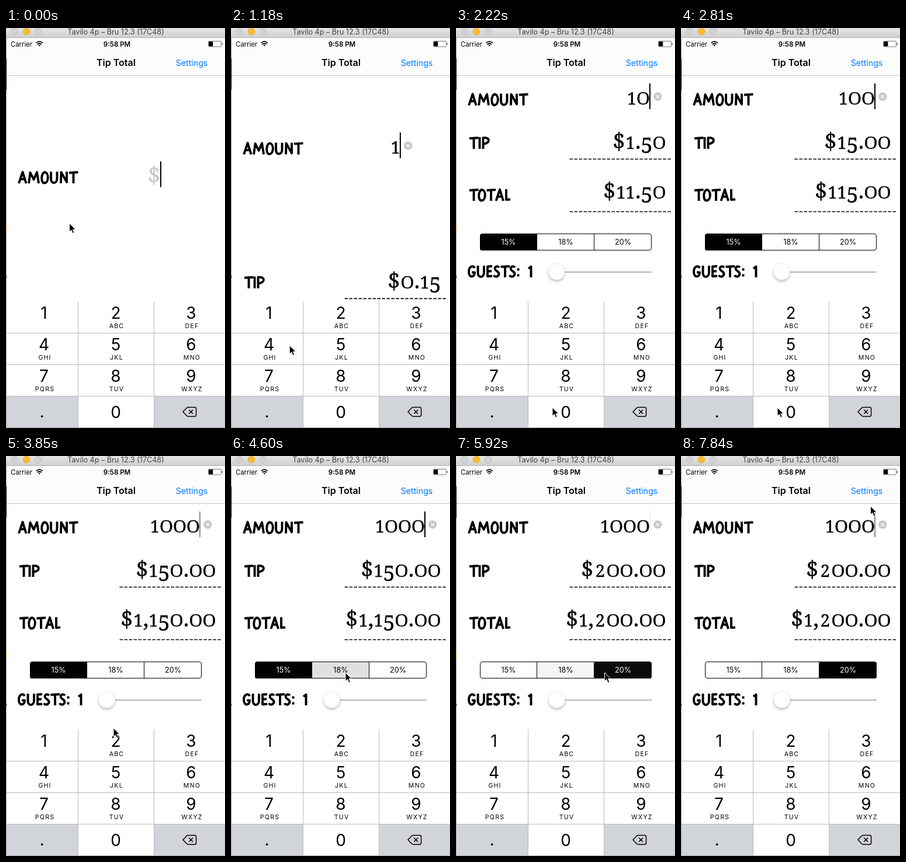
An HTML page that plays this animation: 375 by 685 pixels, repeating every 7990 ms.

```html
<!DOCTYPE html>
<html lang="en">
<head>
<meta charset="utf-8">
<title>Tip Total</title>
<style>
html, body { margin: 0; width: 100%; height: 100%; overflow: hidden; background: #fff; }
svg { display: block; width: 375px; height: 685px; }
text { font-family: Inter, Roboto, sans-serif; text-anchor: middle; }
.num text { font-family: "Noto Serif", serif; stroke-width: .4; }
.num .round { font-family: "Liberation Serif", serif; }
.ink path { fill: none; stroke: #000; stroke-width: 3.9; stroke-linejoin: round; }
.digit { font-size: 28px; }
.abc { font-size: 10.6px; letter-spacing: 1.2px; }
.seg text { font-size: 12.6px; }
</style>
</head>
<body>
<svg viewBox="0 0 375 685" xmlns="http://www.w3.org/2000/svg">
  <defs>
    <linearGradient id="bar" x2="0" y2="1">
      <stop stop-color="#e4e4e4"/><stop offset="1" stop-color="#d0d0d0"/>
    </linearGradient>
    <filter id="shade" x="-50%" y="-50%" width="200%" height="200%">
      <feDropShadow dx="0" dy="2.5" stdDeviation="2" flood-opacity=".28"/>
    </filter>
  </defs>
  <rect width="375" height="685" fill="#fff"/>

  <!-- amount -->
  <g id="amount">
    <g class="ink" data-word="AMOUNT" transform="translate(20 112)"></g>
    <g id="field">
      <g class="num" id="value"></g>
      <rect id="caret" x="331" y="95" width="2" height="44"/>
      <g id="clear">
        <circle cx="345.3" cy="117.5" r="7.2" fill="#c8c8cb"/>
        <path d="M342.5 114.7l5.6 5.6m0-5.6l-5.6 5.6" stroke="#fff" stroke-width="1.3"/>
      </g>
    </g>
  </g>

  <!-- results -->
  <g id="panel">
    <g class="ink" data-word="TIP" transform="translate(23 186.5)"></g>
    <g class="ink" data-word="TOTAL" transform="translate(23 275.5)"></g>
    <g class="ink" data-word="GUESTS:" transform="translate(20 406.5)"></g>
    <g class="ink" data-word="1" transform="translate(123.5 406.5)"></g>
    <g class="num" id="tip"></g>
    <g class="num" id="total"></g>
    <path d="M194.5 224.5H368M194.5 314.5H368" stroke="#000" stroke-width="1.7" stroke-dasharray="5.6 2.39"/>
    <g class="seg" id="segs"></g>
    <path d="M172 418H335" stroke="#b5b5b6" stroke-width="2"/>
    <circle cx="172.5" cy="417.3" r="14" fill="#fff" stroke="#ddd" stroke-width=".5" filter="url(#shade)"/>
  </g>

  <g id="keypad"></g>

  <!-- window and bars -->
  <rect y="16" width="375" height="65" fill="#fcfcfc"/>
  <path d="M0 81.5H375" stroke="#c4c4c6"/>
  <path d="M.5 17V685M0 684.5H375" stroke="#a9a9ab"/>
  <path d="M.5 52V106M.5 424V428" stroke="#111"/>
  <path d="M.5 337V347" stroke="#e79a2e"/>
  <rect width="375" height="16" fill="url(#bar)"/>
  <path d="M0 16.5H375" stroke="#b4b4b4"/>
  <g stroke-width=".8">
    <circle cx="14.5" cy="6" r="5.8" fill="#d2d2d2" stroke="#bcbcbc"/>
    <circle cx="35" cy="6" r="5.8" fill="#fdbd30" stroke="#e0a02a"/>
    <circle cx="55" cy="6" r="5.8" fill="#d2d2d2" stroke="#bcbcbc"/>
  </g>
  <text x="188" y="11" font-size="12.6" fill="#404040">Tavilo 4p – Bru 12.3 (17C48)</text>
  <text x="26.5" y="31.5" font-size="11.3">Carrier</text>
  <g fill="none" stroke="#000" stroke-width="1.7">
    <path d="M51.6 25.6q5.6-4.8 11.2 0M53.6 28q3.6-3 7.2 0"/>
    <path d="M55.4 29.5q1.8-1.4 3.6 0l-1.8 2z" fill="#000" stroke="none"/>
  </g>
  <text x="190" y="31.5" font-size="11.5" font-weight="600">9:58 PM</text>
  <rect x="346.5" y="22.5" width="22" height="9.5" rx="1.5" fill="#fff" stroke="#777"/>
  <rect x="347.3" y="23.3" width="7" height="8"/>
  <rect x="369.6" y="25.5" width="1.5" height="3.5" fill="#777"/>
  <text x="188.5" y="65" font-size="16" font-weight="600">Tip Total</text>
  <text x="318" y="64.5" font-size="14.2" fill="#007aff">Settings</text>

  <path id="cursor" d="M0 0V14.6L3.4 11.5L5.8 17.2L8.3 16.1L5.9 10.6H10.6Z" stroke="#fff" stroke-width="1" stroke-linejoin="round"/>
</svg>
<script>
const $ = id => document.getElementById(id);
const LOOP = 7990, STEPS = 54;

// Marker lettering: [advance, strokes]
const INK = {
  A: [17, "M2 20.5L8.5 1L14.5 20.5M4 13.5L13.5 13"],
  M: [22, "M2 20.5L4.5 2L10.5 14L16 1.5L19 20.5"],
  O: [15.5, "M8 1.5C1 1 0 20 6.5 20C14.5 20 15 2 7 1.5"],
  U: [16.5, "M2.5 .5V13C2.5 22 13 22 13 12V.5"],
  N: [17, "M3 20.5L3.5 1.5L13 18.5V.5"],
  T: [14, "M0 2.5L15.5 1.5M7.5 2V20.5"],
  I: [7, "M3.5 .5V20.5"],
  P: [13, "M2.5 20.5V1.5C15 0 15 11.5 2.5 12"],
  L: [9, "M2.5 .5V18.5L9.5 18"],
  G: [15, "M12 4.5C9-1 1.5 2 2 12C2.5 22 12 20.5 12 12H7"],
  E: [12, "M10.5 1.5L2.5 2V18.8L10.5 18.3M2.5 10.3L9.5 9.8"],
  S: [13, "M10.5 3.5C7-.5 1.5 3 3.5 7C5 10 11 11 10 15.5C8 20.5 3.5 20 1 17"],
  ":": [5, "M3 5V9M3 15V19"],
  1: [9, "M.5 5.5L5 2V20.5"]
};
for (const g of document.querySelectorAll(".ink")) {
  const word = g.dataset.word;
  let x = 0;
  g.setAttribute("aria-label", word);
  g.innerHTML = [...word].map(c => {
    const [w, d] = INK[c], s = `<path transform="translate(${x})" d="${d}"/>`;
    x += w;
    return s;
  }).join("");
}

// Old-style figures: [glyph, advance, size, drop, class]; the low zero is a round capital
const FIG = {
  0: ["O", 23, 30.5, 0, "round"], 1: ["1", 16.1, 28.5, 0], 2: ["2", 21, 29, 0],
  5: ["5", 19.8, 36, 7], 8: ["8", 22.3, 37, 0], $: ["$", 22.9, 38, 0],
  ".": [".", 10.1, 38, 0], ",": [",", 10.1, 38, 0]
};
function figures(id, str, right, y, color = "#000") {
  const g = $(id);
  if (g.getAttribute("aria-label") === str) return;
  g.setAttribute("aria-label", str);
  g.setAttribute("fill", color);
  g.setAttribute("stroke", color);
  let x = right, out = "";
  for (const c of [...str].reverse()) {
    const [glyph, w, size, drop, cls = ""] = FIG[c];
    out = `<text class="${cls}" x="${x - w / 2}" y="${y + drop}" font-size="${size}">${glyph}</text>` + out;
    x -= w;
  }
  g.innerHTML = out;
}

const GREY = "#d1d4d9";
const COLS = [[0, 123, 65], [124, 129, 188], [254, 121, 317]];
const LETTERS = ["", "ABC", "DEF", "GHI", "JKL", "MNO", "PQRS", "TUV", "WXYZ"];
const key = (name, row, col, fill) =>
  `<rect id="k${name}" x="${COLS[col][0]}" y="${468 + row * 54}" width="${COLS[col][1]}" height="55" fill="${fill}"/>`;
let pad = "";
LETTERS.forEach((abc, i) => {
  const row = Math.floor(i / 3), x = COLS[i % 3][2], y = 498 + row * 54;
  pad += key(i + 1, row, i % 3, "#fff") +
    `<text class="digit" x="${x}" y="${y}">${i + 1}</text>` +
    `<text class="abc" x="${x + 1.5}" y="${y + 15.5}">${abc}</text>`;
});
pad += key("dot", 3, 0, GREY) + key(0, 3, 1, "#fff") + key("del", 3, 2, GREY) +
  `<text class="digit" x="61.5" y="666.5">.</text><text class="digit" x="188" y="667.5">0</text>
  <path d="M123.5 468V685M253.5 468V685M0 522.5H375M0 576.5H375M0 630.5H375" stroke="#b9bbbf"/>
  <path d="M303 657.3L309.5 650.6Q310.8 649.4 312.5 649.4H323Q325.6 649.4 325.6 652V662.6Q325.6 665.2 323 665.2H312.5Q310.8 665.2 309.5 664ZM313.2 653.8l7 7m0-7l-7 7" fill="none" stroke="#000" stroke-width="1.5" stroke-linejoin="round"/>`;
$("keypad").innerHTML = pad;

const RATES = [15, 18, 20];
$("segs").innerHTML = RATES.map((r, i) =>
  `<rect id="s${r}" x="${41 + i * 98}" y="352.5" width="98" height="28.5" ${i === 1 ? "" : 'rx="3.5"'}/>` +
  `<text id="t${r}" x="${90 + i * 98}" y="371.3">${r}%</text>`).join("") +
  `<rect x="41.5" y="352.5" width="293" height="28" rx="3.5" fill="none" stroke="#000"/>
  <path d="M138.5 352.5V380.5M236.5 352.5V380.5" stroke="#000"/>`;

// Pointer stops: [step, x, y]
const PATH = [
  [0, 108.5, 334.5], [1, 107, 345], [4, 64, 492], [6, 64, 492], [11, 154.5, 621],
  [13, 165, 650], [23, 165, 650], [26, 184, 466], [29, 196, 371], [33, 196, 371],
  [35, 249.5, 372.5], [37, 254.5, 371], [43, 254.5, 371], [47, 214, 369], [48, 214, 369],
  [50, 245, 310], [52, 333, 112], [53, 324.5, 86]
];
function pointer(n) {
  const i = Math.max(1, PATH.findIndex(p => p[0] >= n));
  const [a, ax, ay] = PATH[i - 1], [b, bx, by] = PATH[i], f = (n - a) / (b - a);
  return [ax + (bx - ax) * f, ay + (by - ay) * f];
}

const clamp = v => Math.min(1, Math.max(0, v));
const easeInOut = p => p < .5 ? 2 * p * p : 1 - 2 * (1 - p) ** 2;
const fade = d => d < 0 ? 0 : d < 1 ? .5 : d < 2 ? .96 : 1;
const chosen = d => d < 0 && d >= -2 ? .12 : fade(d);
const money = v => "$" + v.toFixed(2).replace(/\B(?=(\d{3})+\.)/g, ",");

function caretAlpha(n) {
  if (n < 24) return 1;
  const p = n * LOOP / STEPS / 1000 % 1;
  return p < .5 ? clamp((p - .25) / .15) : clamp((.926 - p) / .18);
}

function draw(n) {
  const typed = [6, 14, 18, 22].filter(s => n >= s).length;
  const amount = typed ? 10 ** (typed - 1) : 0;
  const rate = n < 32 ? 15 : n < 39 ? 18 : 20;
  const left = 1 - easeInOut(clamp((n - 5.5) / 5.8));

  figures("value", typed ? String(amount) : "$", 332, 131, typed ? "#000" : "#c7c7cd");
  figures("tip", money(amount * rate / 100), 359.5, 207);
  figures("total", money(amount * (100 + rate) / 100), 359.5, 292);
  $("amount").setAttribute("transform", `translate(0 ${133.5 * left})`);
  $("field").setAttribute("transform", `translate(${-67 * left})`);
  $("panel").setAttribute("transform", `translate(0 ${380 * left})`);
  $("clear").setAttribute("opacity", typed ? 1 : 0);
  $("caret").setAttribute("opacity", caretAlpha(n));

  $("k1").setAttribute("fill", n === 5 ? GREY : "#fff");
  $("k0").setAttribute("fill", [13, 17, 21].includes(n) ? GREY : "#fff");

  const levels = [1 - fade(n - 32), chosen(n - 32) * (1 - fade(n - 39)), chosen(n - 39)];
  RATES.forEach((r, i) => {
    const v = Math.round(255 * (1 - levels[i]));
    $("s" + r).setAttribute("fill", `rgb(${v},${v},${v})`);
    $("t" + r).setAttribute("fill", levels[i] > .4 ? "#fff" : "#000");
  });
  $("cursor").setAttribute("transform", `translate(${pointer(n)})`);
}

const start = performance.now();
function tick() {
  const t = (performance.now() - start) % LOOP;
  draw(Math.min(STEPS - 1, Math.floor((t + 10) * STEPS / LOOP)));
  requestAnimationFrame(tick);
}
tick();
</script>
</body>
</html>
```
